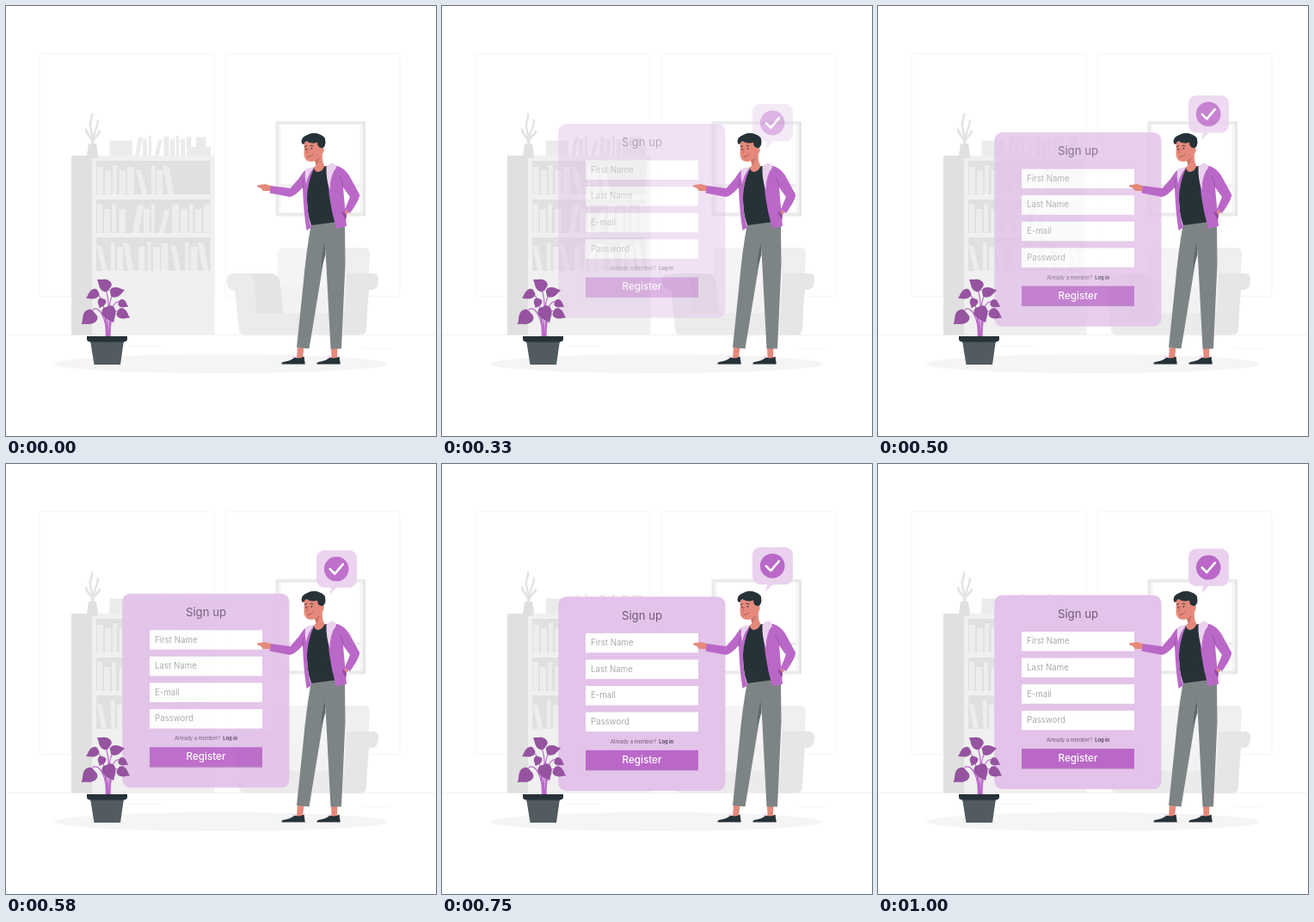
Write an HTML page with a canvas that moves like this. It is 500 by 500 pixels and loops after 1040 ms.

```html
<!DOCTYPE html>
<html lang="en">
<head>
<meta charset="utf-8">
<title>Sign up</title>
<style>
html, body { margin: 0; width: 100%; height: 100%; overflow: hidden; background: #fff; }
canvas { display: block; width: 500px; height: 500px; }
</style>
</head>
<body>
<canvas id="stage"></canvas>
<script>
const SIZE = 500, LOOP = 1040, FPS = 24, TRAVEL = 30;
const dpr = window.devicePixelRatio || 1;
const PURPLE = '#ba68c8', LEAF = '#9553a0', LILAC = '#e3c3e9', DARK = '#263238', SKIN = '#e4897b';
const FONT = 'Inter, "Open Sans", sans-serif';

function layer(canvas = document.createElement('canvas')) {
  canvas.width = canvas.height = SIZE * dpr;
  const c = canvas.getContext('2d');
  c.scale(dpr, dpr);
  return c;
}

const stage = layer(document.getElementById('stage'));
const room = layer(), people = layer(), form = layer();

function rect(c, color, x, y, w, h) {
  c.fillStyle = color;
  c.fillRect(x, y, w, h);
}
function rounded(c, color, x, y, w, h, r) {
  c.fillStyle = color;
  c.beginPath();
  c.roundRect(x, y, w, h, r);
  c.fill();
}
function ellipse(c, color, x, y, rx, ry = rx) {
  c.fillStyle = color;
  c.beginPath();
  c.ellipse(x, y, rx, ry, 0, 0, Math.PI * 2);
  c.fill();
}
function shape(c, color, d) {
  c.fillStyle = color;
  c.fill(new Path2D(d));
}
function line(c, color, width, d) {
  c.strokeStyle = color;
  c.lineWidth = width;
  c.lineCap = c.lineJoin = 'round';
  c.stroke(new Path2D(d));
}
function text(c, str, x, y, size, weight, color, align = 'left') {
  c.font = `${weight} ${size}px ${FONT}`;
  c.fillStyle = color;
  c.textAlign = align;
  c.fillText(str, x, y);
}

// Each book: left edge at the foot, width, height, sideways lean of the top
function books(c, color, base, list) {
  for (const [x, w, h, lean = 0] of list) {
    const rise = lean ? Math.sign(lean) * 1.4 : 0;
    shape(c, color, `M${x} ${base}l${lean} ${-h + rise}l${w} ${-rise}l${-lean} ${h}z`);
  }
}

function drawShelf(c) {
  rect(c, '#e0e0e0', 76, 174, 24, 208.5);
  rect(c, '#f0f0f0', 100, 174, 142.5, 208.5);
  for (const y of [180, 225, 269]) rect(c, '#e0e0e0', 105, y, 132.5, 39);
  const pale = '#ededed';
  books(c, pale, 219, [[106, 7, 32], [115, 7, 28], [124, 5, 34], [131.5, 8, 28], [141, 8, 32],
    [158, 6.5, 28, -7], [169, 4.5, 34], [175, 7.5, 28], [188.5, 7, 32, -6]]);
  books(c, pale, 264, [[106, 6, 34], [114, 7, 28], [123, 5, 34], [131.5, 7.5, 28], [147, 7, 33, 6],
    [160, 7, 28], [169, 4, 34], [177.5, 6, 28, 7], [193, 8, 33], [203, 8, 28], [213, 4.5, 34],
    [220, 7, 28], [229.5, 8, 33]]);
  books(c, pale, 308, [[111.5, 6, 28, -6], [122, 4.5, 33], [129, 7, 28], [142, 6.5, 32, -6],
    [154, 7.5, 28], [164.5, 4, 34], [171, 8, 28], [180.5, 8, 32], [197.5, 6, 28, -6],
    [208, 4.5, 33], [214.5, 8, 28], [229, 6.5, 32, -6]]);
  books(c, '#ebebeb', 174, [[120.5, 26.5, 17.5], [150, 5, 22, 4], [159, 5, 19], [166, 3, 23],
    [173, 4.5, 19, 4], [183.5, 6, 22], [191, 5, 19], [198, 3, 23], [203, 5.5, 19], [210, 5.5, 22],
    [215, 23, 10], [221, 11.5, 21.5]]);
  shape(c, '#e0e0e0', 'M96 160h9l2 14-1 3H95l-1-3z');
  const twig = '#e3e3e3';
  line(c, twig, 2.6, 'M100.5 161C102 150 97 143 98 137S101 129 100 126');
  line(c, twig, 2.8, 'M101 159C100 151 94 151 93 144M101 158C103 150 108 151 109 146');
  line(c, twig, 2.4, 'M102 154C102 145 107 141 107 133');
}

function drawSofa(c) {
  shape(c, '#f4f4f4', 'M313 357L316 288Q317 281 324 281H398V357Z');
  shape(c, '#efefef', 'M395 281H417Q423 281 423 288L421 325H395Z');
  shape(c, '#ebebeb', 'M266 329L271 376Q272 382.5 278 382.5H412Q418 382.5 419 376L421 325H394L395 357H300Z');
  shape(c, '#f2f2f2', 'M291 326H397V357H291Z');
  shape(c, '#ebebeb', 'M264 311H300L292 358H270L267 331Q258 330 257 323Q254 312 264 311Z');
  shape(c, '#e4e4e4', 'M281 311H309Q318 312 319 325L322 357H291L289 324Q288 313 281 311Z');
  shape(c, '#e6e6e6', 'M396 311H427Q433 311 433 318Q433 330 425 330H422L418.500 376Q418 382.500 412 382.500H392Z');
}

function drawRoom(c) {
  rect(c, '#fff', 0, 0, SIZE, SIZE);
  c.strokeStyle = '#f6f6f6';
  c.lineWidth = 1;
  for (const x of [39, 255]) {
    c.beginPath();
    c.roundRect(x, 55.5, 203, 282, 3);
    c.stroke();
  }
  rect(c, '#efefef', 0, 382, SIZE, 0.8);
  rect(c, '#f3f3f3', 415, 398, 33, 0.8);
  rect(c, '#f3f3f3', 143, 395, 40, 0.8);
  drawShelf(c);
  rounded(c, '#ebebeb', 313.5, 134, 104.5, 110.5, 1);
  rect(c, '#f5f5f5', 317, 137.5, 98, 103);
  rect(c, '#fff', 319.500, 138, 92, 102);
  rect(c, '#f0f0f0', 319, 207, 93, 4);
  rect(c, '#e3e3e3', 415.500, 135, 2, 109);
  drawSofa(c);
  ellipse(c, '#f5f5f5', 249.5, 416, 193.5, 11);
}

// Heart-shaped leaf growing from its stalk at (x, y)
function leaf(c, x, y, deg, len, wide) {
  c.save();
  c.translate(x, y);
  c.rotate(deg * Math.PI / 180);
  c.scale(len, wide);
  shape(c, LEAF, 'M0 0C-.1 -.55 .35 -.68 .65 -.36Q.82 -.15 1 0Q.82 .15 .65 .36C.35 .68 -.1 .55 0 0Z');
  c.restore();
}

function drawPlant(c) {
  line(c, PURPLE, 1.2, 'M118 386C118 362 122 342 115 328M117 386C117 360 107 348 101 353' +
    'M119 386C118 360 119 344 125 334M120 386C121 358 123 341 134 344' +
    'M118 386C117 360 115 350 111 345M120 386C120 374 120 366 122 355' +
    'M116.5 386C116 355 112 335 104 335M121 386C121 362 125 352 132 355');
  leaf(c, 120.5, 328.5, 216, 18, 13);
  leaf(c, 107, 332, 150, 16, 10.5);
  leaf(c, 121.5, 334, -12, 17, 11);
  leaf(c, 113, 340.5, 112, 11.5, 9);
  leaf(c, 131.5, 344, 28, 12, 8.5);
  leaf(c, 117, 350, 66, 20, 15);
  leaf(c, 103, 357, 139, 20, 16);
  leaf(c, 130, 355, 28, 16, 11);
  shape(c, '#515b60', 'M98 389H137L133 417H102.500Z');
  shape(c, '#465156', 'M98 389H137L136.700 391.800H98.500Z');
  shape(c, DARK, 'M94 384H141V387Q141 390.500 137 390.500H98Q94 390.500 94 387Z');
}

function drawLegs(c) {
  shape(c, SKIN, 'M339 396H346.500L345 410H338Z M378 396H385.500L385 410H378.500Z');
  const shoe = 'Q330 413 336 408.500Q341 411 346.500 407.500L347.800 416.500H320.500Q320 414.500 322 414Z';
  for (const dx of [0, 41]) {
    c.save();
    c.translate(dx, 0);
    shape(c, DARK, 'M322 414' + shoe);
    line(c, LILAC, 1, 'M332.500 409l2.500-2.500M334 408l3 .5');
    c.restore();
  }
  shape(c, '#7d8486', 'M355 253L384 249L394 255L394.500 300L390 398.500H377.500L371.500 283L352.500 398.500L338 397L345.500 325Q349 285 355 253Z');
  shape(c, '#5f686b', 'M370.500 276L371.500 289L366.500 305Q367 288 370.500 276Z');
}

function drawTorso(c) {
  shape(c, SKIN, 'M308 209L301 207L292 208.500Q291 210.500 296 211.500L299 215H308Z');
  shape(c, SKIN, 'M391 236L397 237L398 241L394 243.500L390 240Z');
  shape(c, DARK, 'M356 188L374 186Q376 215 385 251L355 255Q349 240 350 214Z');
  shape(c, PURPLE, 'M349 190Q345 193 341 200L330.500 212L308 209L306.500 217.500L330 222Q335 222 345 211Q346 240 349.500 261L355 257.500Q350 243 350 222Q351 204 358 189Z');
  shape(c, PURPLE, 'M374 187L385 186Q393 188 399 197L411 219Q412 224 400 241L394 236.500L400 222L392 211L396 256L384 258.500Q373 220 374 187Z');
  line(c, LEAF, 0.9, 'M392 209Q391 203 388 199M345 211Q345 205 346 202');
  shape(c, '#8f4f9b', 'M391 238L396 243L395.500 248Q391 244 391 238Z');
  shape(c, '#ead2ee', 'M348 190Q352 187 358 188Q351 196 349 207Q347 198 348 190Z');
  shape(c, '#ead2ee', 'M372.500 187Q377 182 382 183L384 188Q377 196 376.500 214Q372 201 372.500 187Z');
  shape(c, SKIN, 'M358.500 176L368 171Q367 181 370.500 186Q368 193 362 193Q358 191 358 188L360.500 185Z');
}

function drawHead(c) {
  shape(c, '#cb756a', 'M359 179L365 176Q363 183 360.500 185Z');
  shape(c, SKIN, 'M347 158L346.500 172Q347 181 355 181Q362 181 365 173Q370 172 369.500 166L365 156Z');
  shape(c, DARK, 'M344 160Q342 153 350 150Q357 146 364 149Q372 151 371.500 159Q371 164 367.500 165.500L364 164Q362 162 362 158.500Q356 161 350 157.500Q347 157 346.500 161Z');
  ellipse(c, SKIN, 367, 168, 2.4, 3);
  ellipse(c, DARK, 349, 166.5, 0.75, 1);
  ellipse(c, DARK, 355.500, 165.800, 0.75, 1);
  line(c, DARK, 0.9, 'M347.200 163.500l2.300-.8M354 162.500q1.800-.8 3 .3');
  line(c, '#c95f55', 0.9, 'M351.500 166L349.500 170.500L351 171.200');
  line(c, '#a84c47', 0.9, 'M351 175.500Q355 175 357 172.500');
}

function drawPanel(c) {
  rounded(c, LILAC, 135.3, 152.5, 194.2, 225.6, 9);
  text(c, 'Sign up', 232.5, 178.7, 13.2, 400, '#6d5b75', 'center');
  ['First Name', 'Last Name', 'E-mail', 'Password'].forEach((label, i) => {
    const y = 195 + i * 30.6;
    rect(c, '#fff', 167, y, 131, 22.5);
    text(c, label, 173, y + 14.3, 9.7, 400, '#a8abad');
  });
  text(c, 'Already a member?', 196, 323, 5.8, 400, '#6d5b75');
  text(c, 'Log in', 269.2, 323, 5.8, 700, '#55465c', 'right');
  rect(c, '#ad78b8', 167, 353, 131, 1.5);
  rect(c, PURPLE, 167, 331, 131, 22.5);
  text(c, 'Register', 232.5, 346, 11.7, 500, '#fff', 'center');
}

function drawBubble(c) {
  const fill = '#ead2ee';
  rounded(c, fill, 361, 98.5, 47, 43.5, 9);
  shape(c, fill, 'M378.500 140L376.300 150.200L386.500 140Z');
  ellipse(c, PURPLE, 384.2, 120.3, 14.3);
  line(c, '#fff', 2.6, 'M376.800 120.500L382.300 126L391.800 114.800');
}

// cubic-bezier(.36, -.01, .5, 1.38)
function ease(x) {
  if (x >= 1) return 1;
  const curve = (s, a, b) => 3 * (1 - s) ** 2 * s * a + 3 * (1 - s) * s * s * b + s ** 3;
  let lo = 0, hi = 1;
  for (let i = 0; i < 24; i++) {
    const mid = (lo + hi) / 2;
    if (curve(mid, 0.36, 0.5) < x) lo = mid; else hi = mid;
  }
  return curve(lo, -0.01, 1.38);
}

function paste(from, alpha = 1) {
  stage.globalAlpha = alpha;
  stage.drawImage(from.canvas, 0, 0, SIZE, SIZE);
  stage.globalAlpha = 1;
}

function slide(draw, dy) {
  form.save();
  form.translate(0, dy);
  draw(form);
  form.restore();
}

function render(ms) {
  const step = Math.floor(Math.floor(ms / 10) * 10 * FPS / 1000 + 0.1);
  paste(room);
  if (step >= 2) {
    const p = ease((step + 1) / FPS);
    form.clearRect(0, 0, SIZE, SIZE);
    slide(drawPanel, (p - 1) * TRAVEL);
    slide(drawBubble, (1 - p) * TRAVEL);
    paste(form, Math.min(1, Math.max(0, p)));
  }
  paste(people);
}

drawRoom(room);
drawPlant(people);
drawLegs(people);
drawTorso(people);
drawHead(people);

const start = performance.now();
function tick() {
  render((performance.now() - start) % LOOP);
  requestAnimationFrame(tick);
}
tick();
</script>
</body>
</html>
```
